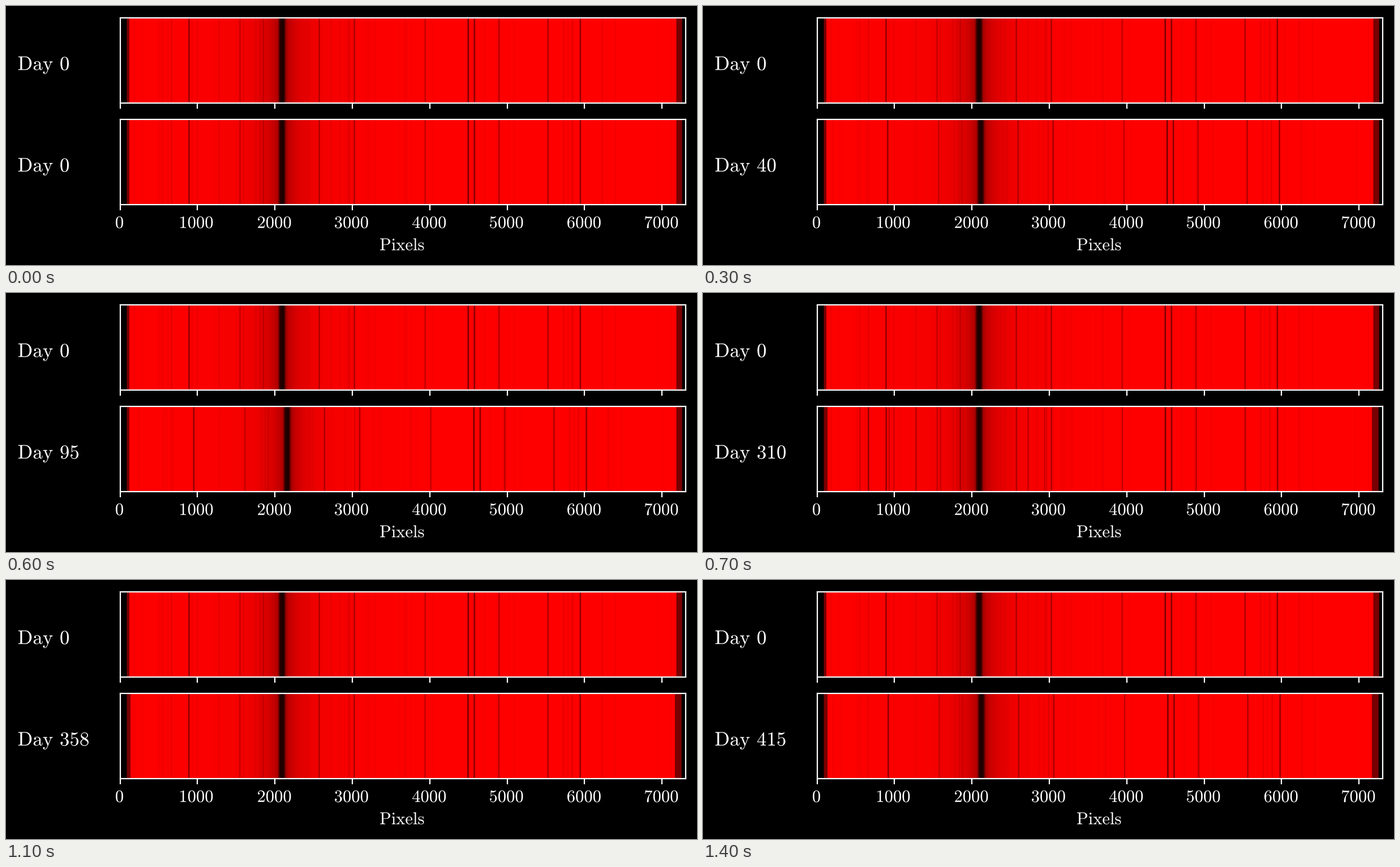
Write a matplotlib script that moves like this. It is 1221x459 px and loops after 1500 ms.

```python
import numpy as np
import matplotlib.pyplot as plt
from matplotlib.animation import FuncAnimation
from matplotlib.colors import LinearSegmentedColormap
from matplotlib.patches import PathPatch
from matplotlib.textpath import TextPath
from matplotlib.transforms import Affine2D

W, H, DPI = 1221, 459, 200
LEFT, WIDTH, HEIGHT = 201.6, 999.4, 151
TOPS = (21, 201)
SCALE = 0.1368  # screen pixels per axis unit
COLUMNS, SUB = 1000, 4
FRAMES = 15
SMALL, LARGE = 30.6, 35  # text sizes in screen pixels

plt.rcParams["mathtext.fontset"] = "cm"
rng = np.random.default_rng(5)

# (screen x, depth) of the main lines that follow the star
STAR = [(323, .55), (413, .25), (454, .14), (553, .36), (606, .14),
        (615, .4), (740, .3), (816, .68), (827, .6), (870.5, .34),
        (957, .4), (1000, .14), (1014, .55)]
# main lines of the Earth's air, fixed in place
AIR = [(277, .2), (292, .5), (328.5, .26), (337, .26), (376, .35),
       (419.5, .2), (454, .2), (574, .28), (603, .22)]


def faint_lines(count, depth, low, high):
    return list(zip(rng.uniform(low, high, count), rng.uniform(0, depth, count)))


STAR += faint_lines(50, .06, 225, 1175)
AIR += faint_lines(20, .06, 225, 700)

x = LEFT + (np.arange(COLUMNS * SUB) + .5) * WIDTH / (COLUMNS * SUB)


def day_at(frame):
    return int(np.interp(frame, (0, 2, 4, 6, 7, 11, 14),
                         (0, 16, 65, 95, 310, 358, 415)))


def humidity(frame):
    if frame < 7:
        return .1 + .15 * np.exp(-frame)
    return .1 + .9 * np.exp((7 - frame) / 1.5)


def orbit(day):
    return 1 - np.cos(2 * np.pi * (day + 25) / 365)


def doppler(pos, day):
    return pos + 6.1 * (orbit(day) - orbit(0)) * (1 + .27 * (pos - 323) / 691)


def dip(pos, depth, sigma=.8):
    return 1 - depth * np.exp(-.5 * ((x - pos) / sigma) ** 2)


def spectrum(frame):
    day = day_at(frame)
    dx = np.abs(x - doppler(487.3, day))
    flux = 1 - .38 / (1 + (dx / 20) ** 1.5) - .51 * np.exp(-(dx / 6) ** 4)
    for pos, depth in STAR:
        flux *= dip(doppler(pos, day), depth)
    for pos, depth in AIR:
        flux *= dip(pos, depth * humidity(frame))

    # dim and blank margins of the detector
    late = day >= 310
    flux[(x < 217.7 + 2 * late) | (x > 1183.5 - 2.5 * late)] = .47
    flux[(x < 213.2) | (x > 1193.7 - late)] = 0
    return flux.reshape(COLUMNS, SUB).mean(axis=1)[None, :]


fig = plt.figure(figsize=(W / DPI, H / DPI), dpi=DPI, facecolor="black")
red = LinearSegmentedColormap.from_list("red", ["black", "red"], N=256)
to_screen = Affine2D().scale(1 / W, 1 / H) + fig.transFigure


def text_path(left, baseline, text, size):
    """Outline whose ink starts at left, in screen pixels."""
    path = TextPath((0, 0), rf"$\mathrm{{{text}}}$", size=size)
    move = Affine2D().translate(left - path.get_extents().x0, H - baseline)
    return path.transformed(move)


def label(*args):
    patch = PathPatch(text_path(*args), facecolor="white", linewidth=0,
                      transform=to_screen)
    return fig.add_artist(patch)


def day_label(top, day):
    return 21.7, top + 92.6, rf"Day\hspace{{0.38}}{day}", LARGE


def panel(top):
    ax = fig.add_axes([LEFT / W, 1 - (top + HEIGHT) / H, WIDTH / W, HEIGHT / H])
    image = ax.imshow(spectrum(0), cmap=red, vmin=0, vmax=1, aspect="auto",
                      interpolation="nearest", extent=(0, WIDTH / SCALE, 0, 1))
    ax.set_xticks(range(0, 7001, 1000), labels=[])
    ax.set_yticks([])
    ax.tick_params(color="white", length=3.5, width=.8)
    for spine in ax.spines.values():
        spine.set(color="white", linewidth=.8)
    return image, label(*day_label(top, 0))


panel(TOPS[0])
moving, counter = panel(TOPS[1])

for tick in range(0, 7001, 1000):
    half = len(str(tick)) * SMALL / 4
    label(round(LEFT + tick * SCALE - half), 393.4, str(tick), SMALL)
label(661, 433, "Pixels", SMALL)


def update(frame):
    moving.set_data(spectrum(frame))
    counter.set_path(text_path(*day_label(TOPS[1], day_at(frame))))
    return moving, counter


anim = FuncAnimation(fig, update, frames=FRAMES, interval=100,
                     repeat=True, repeat_delay=0, blit=False)
plt.show()
```
